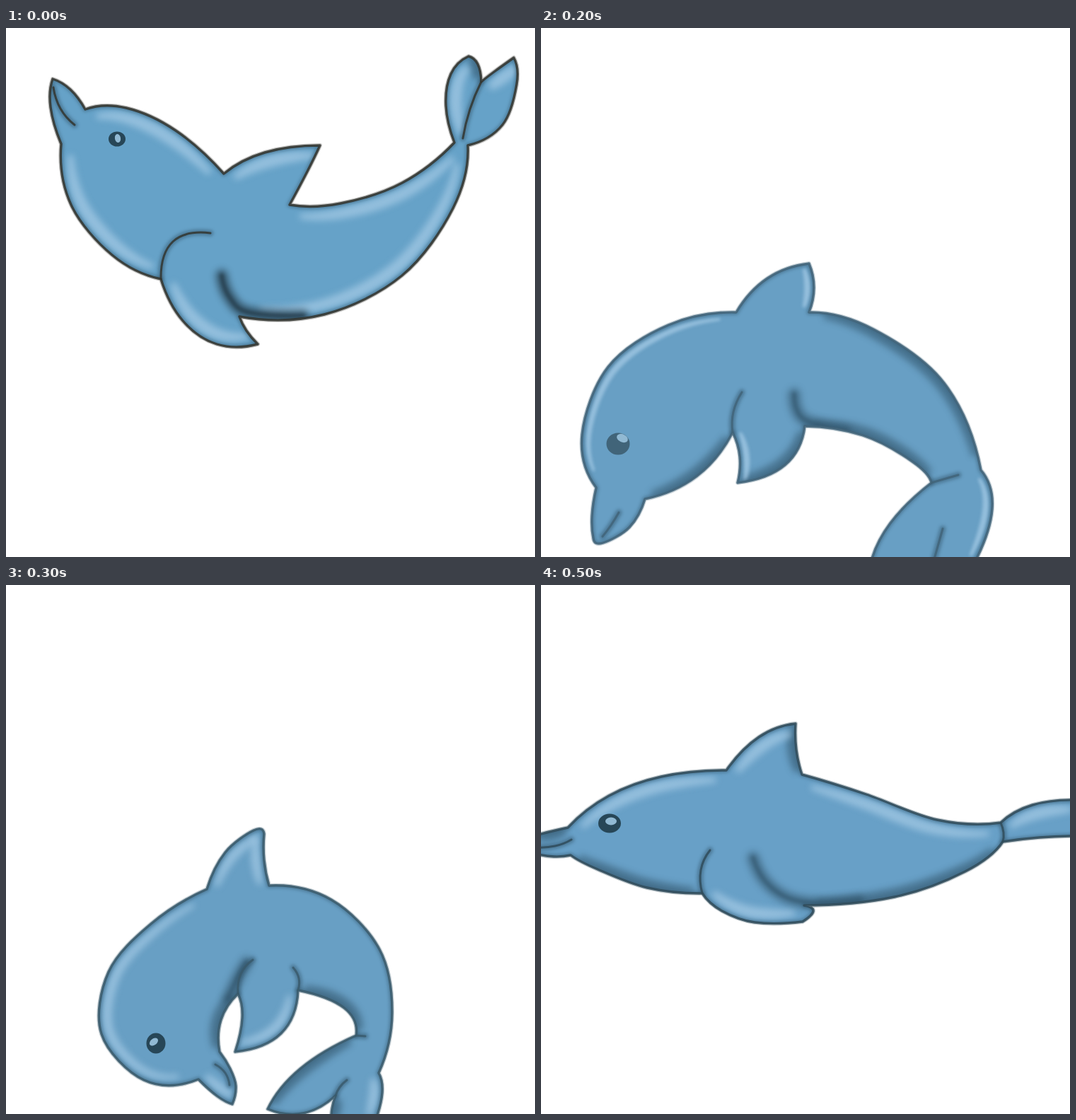
These frames come from a looping animation (748x748 px, 0.6 s). An HTML page:

```html
<!DOCTYPE html>
<html lang="en">
<head>
<meta charset="utf-8">
<title>Swimming dolphin</title>
<style>
html, body { margin: 0; width: 100%; height: 100%; overflow: hidden; background: #fff; }
svg { display: block; width: 100vw; height: 100vh; }
path { fill: none; stroke-linecap: round; stroke-linejoin: round; }
.pose { visibility: hidden; animation: 600ms step-end infinite; }
.rise { animation-name: rise; }
.glide { animation-name: glide; }
.dive { animation-name: dive; }
.curl { animation-name: curl; }
@keyframes rise { 0% { visibility: visible } 16.666%, 100% { visibility: hidden } }
@keyframes glide { 0%, 33.333% { visibility: hidden } 16.666%, 83.333% { visibility: visible } 100% { visibility: hidden } }
@keyframes dive { 0%, 50%, 83.333% { visibility: hidden } 33.333%, 66.666% { visibility: visible } 100% { visibility: hidden } }
@keyframes curl { 0%, 66.666% { visibility: hidden } 50% { visibility: visible } 100% { visibility: hidden } }
</style>
</head>
<body>
<svg id="stage" viewBox="0 0 748 748" xmlns="http://www.w3.org/2000/svg">
  <defs id="defs">
    <filter id="soft" filterUnits="userSpaceOnUse" x="-30" y="-30" width="808" height="808" color-interpolation-filters="sRGB"><feGaussianBlur stdDeviation="2"/></filter>
    <filter id="wide" filterUnits="userSpaceOnUse" x="-30" y="-30" width="808" height="808" color-interpolation-filters="sRGB"><feGaussianBlur stdDeviation="5"/></filter>
  </defs>
</svg>
<script>
const NS = 'http://www.w3.org/2000/svg';
const LIGHT = '#a3c9e4', DEEP = '#34586f';

// Edges run clockwise from the beak tip; each starts where the last one ended.
// light and shade name the edges that get a rim of that tone just inside them.
const poses = [
  {
    name: 'rise', skin: '#66a2c8', ink: '#33352f', glow: 17, blur: 'wide', pitInk: '#1f333f',
    start: '66 72',
    edges: {
      beak: '91 87 112 115', head: '170 113 240 145 308 206',
      fin: '366 176 444 166', finBack: '426 203 401 250',
      back: '473 248 560 219 634 162',
      lobe: '622 110 629 65 654 40', notch: '667 51 672 76',
      lobeTop: '690 62 718 42', lobeBack: '722 80 702 137 653 166',
      rear: '632 255 560 350 450 405 330 408', tip: '340 428 356 447',
      under: '298 447 250 414 219 355', belly: '150 321 92 250 78 164', chin: '63 112 66 72'
    },
    light: 'head fin back lobe lobeTop rear under belly', shade: 'notch',
    creases: ['67 84 77 114 97 137', '219 355 236 302 289 290', '672 76 656 115 646 156'],
    pit: '305 350 317 382 343 402 420 407',
    eye: [157, 157, 12, 10.5], glint: [158, 156, 80]
  },
  {
    name: 'glide', skin: '#68a0c7', ink: '#304c5b', glow: 16, blur: 'wide', pitInk: DEEP,
    start: '-8 354',
    edges: {
      beak: '16 348 38 343', head: '96 298 170 271 262 262',
      fin: '308 215 360 196', finBack: '361 233 369 268',
      back: '460 296 560 332 650 336',
      lobe: '695 311 758 304', side: '758 355', lobeBack: '705 357 653 363',
      rear: '600 405 500 441 372 453', tip: '385 461 370 476',
      under: '302 477 256 461 228 436', belly: '150 428 80 402 42 382', chin: '18 384 -8 380'
    },
    light: 'head fin back lobe under', shade: 'beak rear belly finBack',
    creases: ['-8 371 20 369 43 360', '228 436 226 403 239 375', '650 336 654 350 653 363'],
    pit: '300 386 325 427 370 448 450 447',
    eye: [97, 337, 16, 13.5], glint: [99, 334, 0]
  },
  {
    name: 'dive', skin: '#689fc4', ink: '#416479', glow: 9, blur: 'soft', pitInk: DEEP,
    start: '74 722',
    edges: {
      beak: '72 690 78 650', head: '58 575 95 479 180 420 276 402',
      fin: '320 354 379 333', finBack: '386 367 379 402',
      back: '470 426 570 502 622 625',
      lobe: '638 680 612 758', base: '466 758', lobeBack: '494 700 552 643',
      rear: '525 613 455 576 373 563', under: '345 618 278 643', front: '281 606 271 572',
      belly: '220 634 147 666', chin: '125 706 88 728 74 722'
    },
    light: 'head finBack lobe front', shade: 'back rear belly under',
    creases: ['110 685 99 703 87 719', '271 572 272 543 284 515', '554 758 568 708', '552 643 590 632'],
    pit: '358 518 367 549 395 562 430 570',
    eye: [109, 588, 16.5, 15.5], glint: [115, 580, 25]
  },
  {
    name: 'curl', skin: '#689fc4', ink: '#395a6c', glow: 13, blur: 'wide', pitInk: DEEP,
    start: '320 734',
    edges: {
      beak: '299 723 272 699', head: '195 700 135 635 145 547 205 479 284 430',
      fin: '310 378 350 347 365 352', finBack: '365 389 372 425',
      back: '460 445 528 515 546 605 527 690',
      lobe: '532 718 522 758', base: '460 758', notch: '461 740 466 722',
      lobeBack: '420 747 370 741', lobeTop: '416 684 495 637',
      rear: '478 598 413 573', under: '389 634 324 660', front: '334 612 328 578',
      throat: '304 615 302 660', chin: '317 684 325 708 320 734'
    },
    light: 'head fin finBack beak lobe under', shade: 'throat rear lobeTop notch',
    creases: ['296 678 310 690 316 707', '328 578 332 550 349 530', '413 573 414 556 406 541',
      '466 722 472 710 482 700', '495 637 508 638'],
    pit: '340 534 325 560 314 585',
    eye: [212, 648, 13.5, 14.5], glint: [209, 646, -38]
  }
];

function add(parent, tag, attrs) {
  const el = document.createElementNS(NS, tag);
  for (const key in attrs) el.setAttribute(key, attrs[key]);
  return parent.appendChild(el);
}

function points(text) {
  const n = text.split(' ').map(Number);
  return n.filter((v, i) => i % 2 === 0).map((x, i) => [x, n[2 * i + 1]]);
}

// Smooth cubic run through the points, with parabolic ends.
function curve(run) {
  const last = run.length - 1;
  const mix = (a, b, f) => a.map((v, k) => f(v, b[k]));
  const slope = run.map((p, i) => i && i < last ? mix(run[i - 1], run[i + 1], (a, b) => (b - a) / 2) : null);
  const end = (a, b, m) => mix(a, b, (u, v) => v - u).map((v, k) => m ? 2 * v - m[k] : v);
  slope[0] = end(run[0], run[1], slope[1]);
  slope[last] = end(run[last - 1], run[last], last > 1 ? slope[last - 1] : null);
  let d = '';
  for (let i = 0; i < last; i++) {
    const p = mix(run[i], slope[i], (v, m) => v + m / 3);
    const q = mix(run[i + 1], slope[i + 1], (v, m) => v - m / 3);
    d += `C${p} ${q} ${run[i + 1]}`;
  }
  return d;
}

const openCurve = run => 'M' + run[0] + curve(run);

// Tapered crescent lying inside an edge, thickest halfway along.
function rim(run, inset, width) {
  const path = document.createElementNS(NS, 'path');
  path.setAttribute('d', openCurve(run));
  const length = path.getTotalLength(), outer = [], inner = [], steps = 24;
  for (let i = 0; i <= steps; i++) {
    const t = .06 + .88 * i / steps;
    const p = path.getPointAtLength(length * t), q = path.getPointAtLength(length * t + 1);
    const size = Math.hypot(q.x - p.x, q.y - p.y) || 1;
    const nx = (p.y - q.y) / size, ny = (q.x - p.x) / size;
    const half = width / 2 * Math.sqrt(Math.sin(Math.PI * t));
    outer.push([p.x + nx * (inset - half), p.y + ny * (inset - half)]);
    inner.unshift([p.x + nx * (inset + half), p.y + ny * (inset + half)]);
  }
  return 'M' + outer.concat(inner).join('L') + 'Z';
}

function drawEye(g, [cx, cy, rx, ry], [x, y, turn], fill) {
  add(g, 'ellipse', { cx, cy, rx, ry, fill });
  add(g, 'ellipse', { cx: x, cy: y, rx: rx * .5, ry: rx * .34, fill: '#91b9d3', transform: `rotate(${turn} ${x} ${y})` });
}

function drawPose(pose) {
  const { name, skin, ink, glow, blur } = pose;
  const runs = {};
  let from = points(pose.start)[0], d = 'M' + from;
  for (const key in pose.edges) {
    const run = runs[key] = [from, ...points(pose.edges[key])];
    d += curve(run);
    from = run[run.length - 1];
  }
  d += 'Z';
  add(add(defs, 'clipPath', { id: name }), 'path', { d });

  const g = add(stage, 'g', { class: 'pose ' + name });
  const line = (parent, d, stroke, width, opacity, filter) =>
    add(parent, 'path', { d, stroke, 'stroke-width': width, opacity, filter: filter ? `url(#${filter})` : 'none' });

  line(g, d, ink, 6, .28);
  add(g, 'path', { d, style: 'fill:' + skin });

  const paint = add(g, 'g', { 'clip-path': `url(#${name})` });
  const tint = (keys, color, inset, width, opacity, filter) => {
    for (const key of keys.split(' ')) {
      add(paint, 'path', {
        d: rim(runs[key], inset, width), style: 'fill:' + color, opacity, filter: `url(#${filter})`
      });
    }
  };
  tint(pose.shade, DEEP, 5, 16, .6, 'wide');
  tint(pose.light, LIGHT, 4 + glow * .6, glow, .75, blur);

  const pit = openCurve(points(pose.pit));
  line(paint, pit, pose.pitInk, 18, .6, 'wide');
  line(paint, pit, pose.pitInk, 6, .6, 'soft');
  line(paint, d, DEEP, 7, .5, 'soft');

  line(g, d, ink, 3.4, .88);
  for (const text of pose.creases) {
    const crease = openCurve(points(text));
    line(paint, crease, DEEP, 9, .5, 'soft');
    line(g, crease, ink, 3, .85);
  }
  drawEye(g, pose.eye, pose.glint, name === 'dive' ? ink : '#274657');
}

const stage = document.getElementById('stage');
const defs = document.getElementById('defs');
poses.forEach(drawPose);
</script>
</body>
</html>
```
